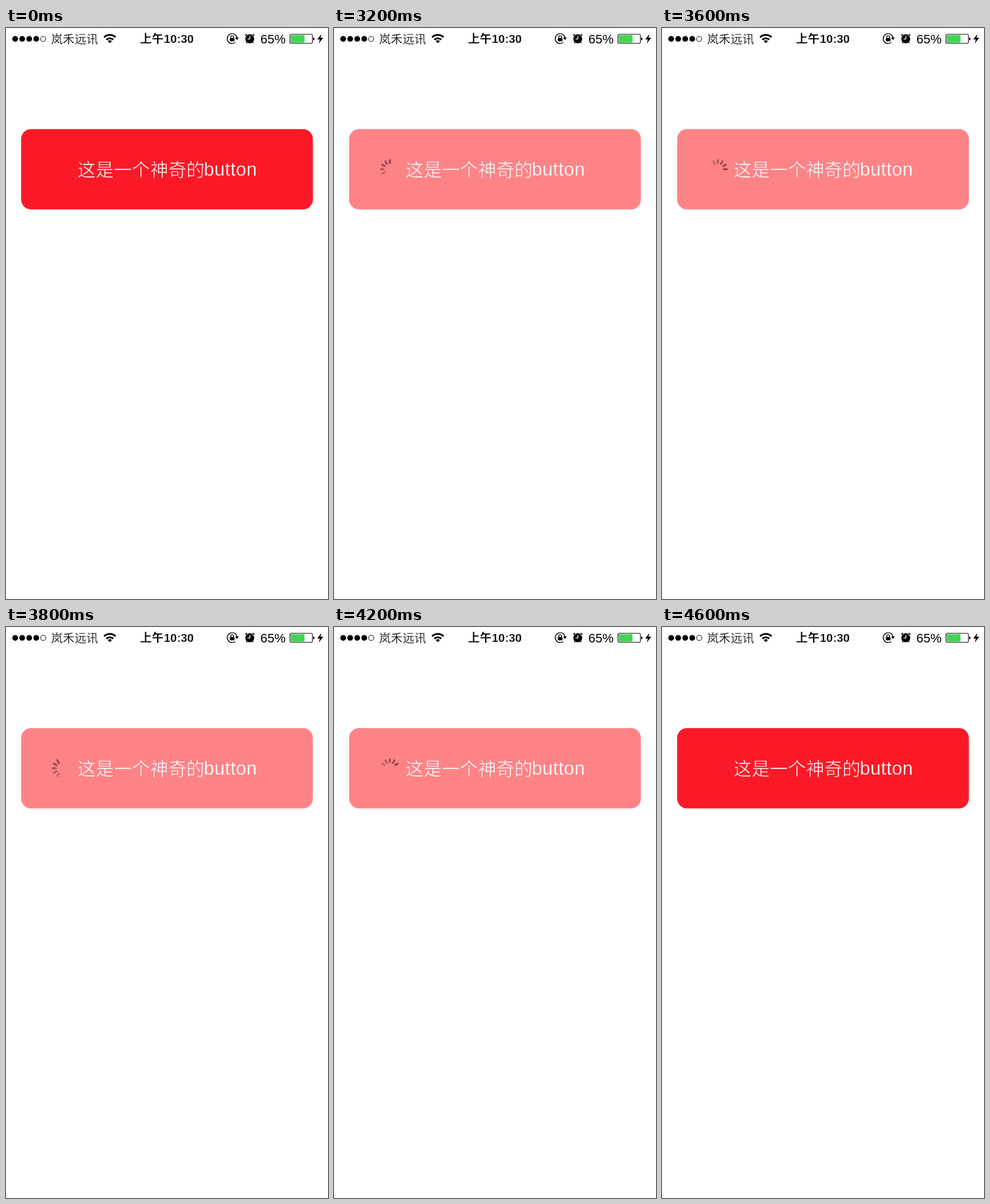
These frames come from a looping animation (562x997 px, 4800 ms). An HTML page:

```html
<!DOCTYPE html>
<html lang="zh-CN">
<head>
<meta charset="utf-8">
<title>Loading button</title>
<style>
  html, body { margin: 0; width: 100%; height: 100%; overflow: hidden; background: #fff; }
  svg { display: block; width: 100%; height: 100%; }
  text { font-family: "Liberation Sans", Arial, sans-serif; }
  .zh { font-family: "Noto Sans CJK SC", "Noto Sans CJK", sans-serif; }
  .line { fill: none; stroke: #000; }
  #button { color: #fc1927; }
  #button.busy { color: #fe8387; }
  #face { fill: currentColor; }
  /* an outline in the face colour thins the lettering */
  #label { fill: #fff; stroke: currentColor; stroke-width: .7; }
  #label text + text { stroke-width: .3; letter-spacing: .45px; }
</style>
</head>
<body>
<svg viewBox="0 0 562 997">
  <!-- status bar -->
  <g>
    <circle cx="16" cy="19" r="5"/>
    <circle cx="28.2" cy="19" r="5"/>
    <circle cx="40.5" cy="19" r="5"/>
    <circle cx="52.8" cy="19" r="5"/>
    <circle class="line" cx="65" cy="19" r="4.6"/>
  </g>
  <text class="zh" x="78.5" y="26.7" font-size="20.6" stroke="#fff" stroke-width=".3">岚禾远讯</text>
  <g class="line" stroke-width="3">
    <path d="M171.2 16.2a14.2 14.2 0 0 1 20 0"/>
    <path d="M175.2 20.4a8.6 8.6 0 0 1 12 0"/>
  </g>
  <path d="M181.2 26.6l-3.7-3.8a5.3 5.3 0 0 1 7.4 0z"/>
  <g font-weight="700" stroke="#fff" stroke-width=".3">
    <text class="zh" x="234" y="26.4" font-size="20.6">上午</text>
    <text x="275.5" y="26.2" font-size="20.4">10:30</text>
  </g>

  <!-- rotation lock -->
  <path class="line" stroke-width="1.4" d="M400.2 25.2A8.6 8.6 0 1 1 403.2 17"/>
  <path d="M399.8 16.6h6.4l-3.2 4.4z"/>
  <rect x="390.7" y="17.4" width="8" height="5.8" rx=".6"/>
  <path class="line" stroke-width="1.3" d="M392.3 18v-2a2.4 2.4 0 0 1 4.8 0v2"/>

  <!-- alarm -->
  <circle cx="425.4" cy="18.9" r="7.8"/>
  <path class="line" stroke-width="1.7" stroke-linecap="round"
        d="M417.8 12.9l2.2-1.9M433 12.9l-2.2-1.9M420.6 24.8l-.9 1M430.2 24.8l.9 1"/>
  <path fill="none" stroke="#fff" stroke-width="1.4" d="M425.6 13.8v5.6h-4"/>

  <text x="444" y="26.6" font-size="22">65%</text>

  <!-- battery -->
  <rect class="line" x="495.6" y="11" width="39.2" height="15.8" rx="2.4" stroke-width="1.1"/>
  <rect x="497" y="12.4" width="24" height="13" rx=".8" fill="#43d552"/>
  <path d="M536 16q2.4.8 2.4 3t-2.4 3z"/>
  <path d="M550.6 10.4l-7.4 9.6h4.6l-2 7 8-10h-4.9z"/>

  <g id="button">
    <rect id="face" x="26.35" y="176.4" width="509.3" height="140.4" rx="17.6"/>
    <g id="spinner" stroke="#8d474a" stroke-width="3.6" stroke-linecap="round"
       transform="translate(97.5 246.5)"></g>
    <g id="label">
      <text class="zh" x="124.7" y="258.8" font-size="31.7" font-weight="300">这是一个神奇的</text>
      <text x="345.2" y="258.2" font-size="32.5">button</text>
    </g>
  </g>
</svg>
<script>
  const LOOP = 4800, START = 3000, END = 4600, STEP = 200;
  // clock hour of the darkest spoke at each step
  const heads = [3, 12, 6, 3, 11, 5, 2, 8];
  const button = document.getElementById('button');
  const spinner = document.getElementById('spinner');

  // the tail runs anticlockwise from the head; the last spoke is a thin trace
  const spokes = [1, .88, .76, .62, .46, .36].map((alpha, i) => {
    const line = document.createElementNS('http://www.w3.org/2000/svg', 'line');
    line.setAttribute('y1', i < 5 ? -10.7 : -13);
    line.setAttribute('y2', -15.7);
    line.setAttribute('opacity', alpha);
    if (i === 5) line.setAttribute('stroke-width', 1.2);
    spinner.append(line);
    return line;
  });

  function draw(t) {
    const busy = t >= START && t < END;
    button.classList.toggle('busy', busy);
    spinner.setAttribute('visibility', busy ? 'visible' : 'hidden');
    if (!busy) return;
    const head = heads[Math.floor((t - START) / STEP)];
    spokes.forEach((s, i) => s.setAttribute('transform', `rotate(${(head - i) * 30})`));
  }

  function tick() {
    draw(performance.now() % LOOP);
    requestAnimationFrame(tick);
  }
  tick();
</script>
</body>
</html>
```
